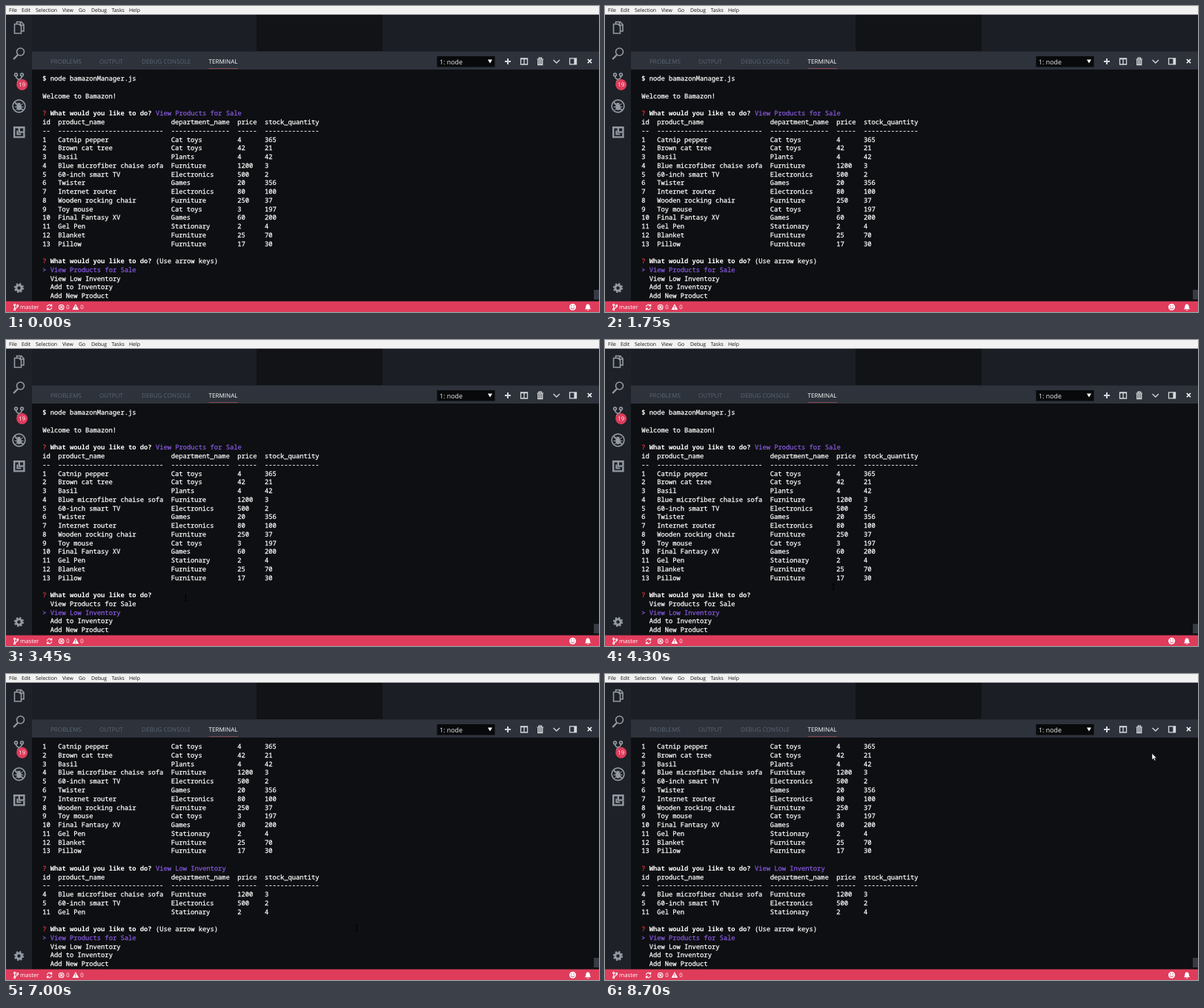
Animation, 800 px wide and 414 px high, one loop 8750 ms. Source, as an HTML page:

```html
<!DOCTYPE html>
<html lang="en">
<head>
<meta charset="utf-8">
<title>Store manager terminal</title>
<style>
html, body { margin: 0; width: 100%; height: 100%; overflow: hidden; background: #0e0f12; }
svg { display: block; width: 800px; height: 414px; }
text { font-family: "Open Sans", "Noto Sans", sans-serif; white-space: pre; text-rendering: geometricPrecision; }
#term text { font: 8.78px "Noto Sans Mono", "DejaVu Sans Mono", monospace; fill: #fff; stroke: #fff; stroke-width: .25; }
#term .b { font-weight: 700; stroke: none; }
#term .r { fill: #dd3540; stroke: #dd3540; }
#term .p { fill: #8659dc; stroke: #8659dc; }
.line { fill: none; stroke: #949aa3; stroke-width: 1.6; }
.tool { fill: none; stroke: #d6d8dc; stroke-width: 1.3; }
.white { fill: none; stroke: #fff; stroke-width: 1.1; }
</style>
</head>
<body>
<svg viewBox="0 0 800 414">
  <rect width="800" height="414" fill="#0e0f12"/>
  <rect x="35" width="765" height="62" fill="#1b1e24"/>
  <rect x="338" y="-109" width="170" height="170" fill="#121317"/>
  <rect x="35" y="61.500" width="765" height="24.500" fill="#2d323b"/>
  <rect y="11" width="35" height="389" fill="#1e2127"/>
  <rect width="800" height="11.600" fill="#f2f2f2"/>
  <g id="menu" font-size="6.9" fill="#111"></g>

  <!-- panel header -->
  <g id="tabs" font-size="8.1" fill="#5b6673"></g>
  <path d="M273.500 84.500H313" stroke="#85464f"/>
  <rect x="581.500" y="68" width="78" height="14.500" fill="#08090b"/>
  <text x="585" y="78.500" font-size="8.9" fill="#f4f4f4">1: node</text>
  <path d="M650 72.500h6l-3 5z" fill="#fff"/>
  <g class="tool">
    <path d="M673 75h8M677 71v8" stroke-width="2"/>
    <path d="M694.500 71h9v8h-9zM699 71v8M694 71.500h10"/>
    <path d="M716.500 72.200h8.500M719 71.500v-1.300h3.500v1.300"/>
    <path d="M717.700 73v6.500h6V73M719.700 73v6M721.700 73v6"/>
    <path d="M738.500 73l4.200 4 4.200-4"/>
    <path d="M760.500 70.800h9v8h-9z"/>
    <path d="M767.800 71v8" stroke-width="3"/>
    <path d="M784.800 72l5.200 5.200M790 72l-5.200 5.200" stroke="#fff" stroke-width="1.6"/>
  </g>

  <!-- activity bar -->
  <g class="line">
    <path d="M14.500 24.500V21.500h6l3.500 3.500v9h-3M11.500 24.500h6l3 3v9.500h-9zM19.500 22v4h4"/>
    <circle cx="19.500" cy="62" r="5"/>
    <path d="M16 66l-5.800 6" stroke-width="2.4"/>
    <circle cx="13.500" cy="93" r="1.9"/><circle cx="21.500" cy="93" r="1.9"/><circle cx="17.500" cy="103" r="1.9"/>
    <path d="M13.500 95q0 3 4 4.500q4-1.500 4-4.500M17.500 99v3"/>
    <circle cx="17.500" cy="135.500" r="8.4"/>
    <ellipse cx="17.500" cy="136.500" rx="2.5" ry="3.7" fill="#949aa3"/>
    <path d="M12 132l3 2M23 132l-3 2M11.500 136.500h12M12.500 141l3-2M22.500 141l-3-2M15.500 131.500h4" stroke-width="1"/>
    <path d="M11.700 129.700l11.600 11.600"/>
    <path d="M17 164.200h-5.800v13.200h13.200v-5.500M17.800 164.200h6.600v6.400h-6.600z" stroke-width="2.4"/>
    <path d="M15.300 168.500v5h5" stroke-width="2"/>
    <circle cx="17.500" cy="381.500" r="3.7" stroke-width="3"/>
    <circle cx="17.500" cy="381.500" r="5.7" stroke-width="2" stroke-dasharray="2.24"/>
  </g>
  <circle cx="21.700" cy="106.500" r="7.5" fill="#df3c5c"/>
  <text x="21.700" y="109.300" font-size="7.6" fill="#fff" text-anchor="middle">19</text>

  <g id="term"></g>
  <rect x="793" y="384" width="7" height="13" fill="#363b45"/>

  <!-- status bar -->
  <rect y="399.500" width="800" height="14.500" fill="#df3c5c"/>
  <g class="white">
    <circle cx="11.700" cy="404.500" r="1.1"/><circle cx="11.700" cy="410.500" r="1.1"/><circle cx="15.700" cy="405.500" r="1.1"/>
    <path d="M11.700 405.500v4M15.700 406.500q0 2-4 2.500"/>
    <path d="M55.500 407a3.200 3.200 0 0 1 5.800-1.500M61.700 408a3.200 3.200 0 0 1-5.800 1.500M61.700 403.500v2.500h-2.500M55.500 411.500V409H58"/>
    <circle cx="74.700" cy="407.500" r="3.3"/>
    <path d="M73.200 406l3 3M76.200 406l-3 3"/>
  </g>
  <path d="M93.900 403l4.300 8h-8.600z" fill="#fff"/>
  <path d="M93.900 405.500v2.700M93.900 409v1.200" stroke="#df3c5c"/>
  <g id="status" font-size="7.75" fill="#fff"></g>
  <circle cx="764.500" cy="407.300" r="4.5" fill="#fff"/>
  <path d="M762.800 405v1.500M766.200 405v1.500M761.800 408.300q2.700 3 5.400 0" fill="none" stroke="#df3c5c"/>
  <path d="M780.800 410.300q1.500-1.300 1.500-4q.2-2.800 2.700-3q2.500.2 2.700 3q0 2.700 1.500 4zM783.800 411h2.400l-1.200 1.200z" fill="#fff"/>

  <path id="beam" d="M-1.500-4h3M0-4v8M-1.500 4h3" stroke="#000" fill="none"/>
  <path id="arrow" d="M0-4.500v8.500l2-1.800 1.400 3 1.400-.7-1.400-2.800h2.700z" fill="#fff" stroke="#000" stroke-width=".4"/>
</svg>
<script>
const LOOP = 8750, KEY_DOWN = 1800, ENTER = 4400, LEAVE = 8250;
const X = 49.2, Y = 101.2, CELL = 5.268, ROW = 11.76;
const $ = id => document.getElementById(id);

const label = (x, y, s, cls = '') => `<text x="${x}" y="${y}" class="${cls}">${s}</text>`;
const labels = (id, y, items) =>
  $(id).innerHTML = items.map(([x, s]) => label(x, y, s)).join('');

labels('menu', 8.4, [[4, 'File'], [21, 'Edit'], [40, 'Selection'], [76, 'View'],
  [98, 'Go'], [115, 'Debug'], [142.5, 'Tasks'], [166, 'Help']]);
labels('tabs', 77.8, [[60, 'PROBLEMS'], [126, 'OUTPUT'], [183, 'DEBUG CONSOLE'], [273.5, 'TERMINAL']]);
labels('status', 410.4, [[19, 'master'], [81.3, '0'], [100.3, '0']]);
$('tabs').lastChild.setAttribute('fill', '#fff');

// A line is a list of [column, text, class] runs.
const plain = s => [[0, s]];
const widths = [2, 27, 15, 5, 14];
const cells = row => plain(row.map((s, i) => s.padEnd(widths[i])).join('  '));
const products = `Catnip pepper,Cat toys,4,365
Brown cat tree,Cat toys,42,21
Basil,Plants,4,42
Blue microfiber chaise sofa,Furniture,1200,3
60-inch smart TV,Electronics,500,2
Twister,Games,20,356
Internet router,Electronics,80,100
Wooden rocking chair,Furniture,250,37
Toy mouse,Cat toys,3,197
Final Fantasy XV,Games,60,200
Gel Pen,Stationary,2,4
Blanket,Furniture,25,70
Pillow,Furniture,17,30`.split('\n').map((s, i) => [String(i + 1), ...s.split(',')]);
const choices = ['View Products for Sale', 'View Low Inventory', 'Add to Inventory', 'Add New Product'];

const table = rows => [
  cells(['id', 'product_name', 'department_name', 'price', 'stock_quantity']),
  cells(widths.map(w => '-'.repeat(w))),
  ...rows.map(cells), []
];
const ask = (s, cls) => [[0, '?', 'r'], [2, 'What would you like to do?', 'b'], [29, s, cls]];
const menu = (pick, hint) => [ask(hint), ...choices.map((s, i) =>
  i === pick ? [[0, '&gt;', 'p'], [2, s, 'p']] : [[2, s]])];

const hint = '(Use arrow keys)';
const first = [plain('$ node bamazonManager.js'), [], plain('Welcome to Bamazon!'), [],
  ask(choices[0], 'p'), ...table(products)];
const second = [...first, ask(choices[1], 'p'), ...table(products.filter(p => p[4] < 5))];
const screens = [
  [...first, ...menu(0, hint)],
  [...first, ...menu(1, '')],
  [...second, ...menu(0, hint)]
].map(lines => lines.slice(-26).map((runs, r) => runs.map(([c, s, cls]) =>
  label(X + c * CELL, Y + r * ROW, s, cls)).join('')).join(''));

// Pointer stops: time, x, y
const stops = [[0, 173, 365], [2550, 173, 365], [4300, 308, 334], [5550, 404, 350],
  [7000, 473, 343], [8100, 473, 343], [8600, 738, 112], [LOOP, 738, 112]];
function pointer(t) {
  const i = stops.findIndex(s => s[0] > t);
  const [a, b] = [stops[i - 1], stops[i]];
  const k = (t - a[0]) / (b[0] - a[0]);
  return [1, 2].map(n => a[n] + (b[n] - a[n]) * k);
}

let shown = -1;
const start = performance.now();
function draw() {
  const t = (performance.now() - start) % LOOP;
  const n = t < KEY_DOWN ? 0 : t < ENTER ? 1 : 2;
  if (n !== shown) $('term').innerHTML = screens[shown = n];
  const at = `translate(${pointer(t)})`;
  $('beam').setAttribute('transform', at);
  $('arrow').setAttribute('transform', at);
  $('beam').style.display = t >= KEY_DOWN && t < LEAVE ? '' : 'none';
  $('arrow').style.display = t >= LEAVE ? '' : 'none';
  requestAnimationFrame(draw);
}
draw();
</script>
</body>
</html>
```
